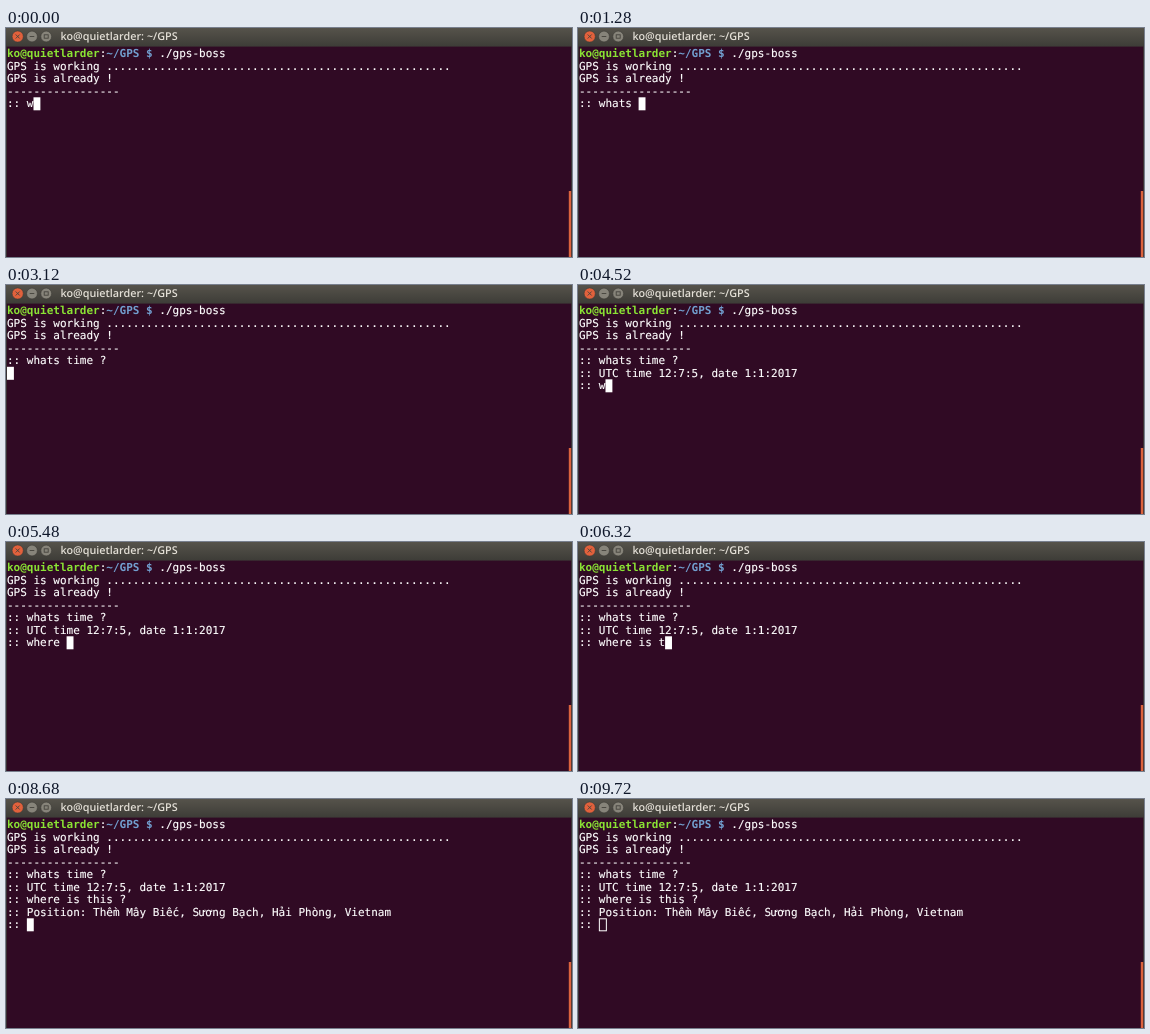
An HTML page for the animation above (9760 ms loop, 566 by 229 pixels).

```html
<!DOCTYPE html>
<html lang="en">
<head>
<meta charset="utf-8">
<title>GPS terminal</title>
<style>
  html, body { margin: 0; width: 100%; height: 100%; overflow: hidden; background: #300a24; }
  svg { display: block; }
  text { white-space: pre; text-rendering: geometricPrecision; }
  .mono { font: 11px "DejaVu Sans Mono", monospace; fill: #fff; stroke: #fff; stroke-width: .15; }
  .title { font: 600 10.8px "Open Sans", "Noto Sans", sans-serif; fill: #e3dfd6; }
  .user { font-weight: bold; fill: #8ae234; stroke: none; }
  .path { font-weight: bold; fill: #729fcf; stroke: none; }
</style>
</head>
<body>
<svg width="566" height="229" viewBox="0 0 566 229">
  <defs>
    <linearGradient id="bar" x2="0" y2="1">
      <stop offset="0" stop-color="#56534b"/>
      <stop offset="1" stop-color="#3d3c37"/>
    </linearGradient>
  </defs>
  <rect width="566" height="229" fill="#3c3b37"/>
  <rect width="566" height="18.6" fill="url(#bar)"/>
  <rect x=".8" y="18.6" width="564.4" height="211" fill="#300a24"/>
  <g stroke="#3d3c37" stroke-width=".6">
    <circle cx="11.7" cy="8.5" r="5.6" fill="#e2613c"/>
    <circle cx="26" cy="8.5" r="5.4" fill="#87847a"/>
    <circle cx="40.2" cy="8.5" r="5.4" fill="#87847a"/>
  </g>
  <g fill="none" stroke="#45433d" stroke-width=".9">
    <path d="M9.7 6.5l4 4m0-4l-4 4M23.7 8.5h4.6"/>
    <rect x="38.2" y="6.8" width="4" height="3.4"/>
  </g>
  <text class="title" x="54.5" y="12.4">ko@quietlarder: ~/GPS</text>
  <rect x="562.8" y="163" width="2.4" height="66" fill="#db633e"/>
  <text class="mono" x="1" y="29.4"><tspan class="user">ko@quietlarder</tspan>:<tspan class="path">~/GPS $</tspan> ./gps-boss</text>
  <g id="rows"></g>
  <rect id="cursor"/>
</svg>
<script>
const LOOP = 9760, CELL = 6.622, ROW = 12.5, LEFT = 1, TOP = 19.3, BLUR_AT = 9320;

const intro = ['GPS is working ' + '.'.repeat(52), 'GPS is already !', '-'.repeat(17), ''].join('\n');

// [time in ms, output appended at that time]
const steps = [
  [0, ':: w'], [280, 'h'], [520, 'a'], [1120, 't'], [1200, 's'], [1280, ' '],
  [1480, 't'], [1640, 'i'], [1720, 'm'], [1880, 'e'], [2040, ' '], [2200, '?'],
  [2880, '\n'],
  [3680, ':: UTC time 12:7:5, date 1:1:2017\n:: '],
  [4520, 'w'], [4720, 'he'], [4800, 'r'], [5080, 'e'], [5320, ' '],
  [5800, 'i'], [5960, 's'], [6120, ' '], [6320, 't'], [6520, 'h'],
  [6680, 'i'], [6760, 's'], [6800, ' '], [6880, '?'],
  [7600, '\n'],
  [8680, ':: Position: Thềm Mây Biếc, Sương Bạch, Hải Phòng, Vietnam\n:: ']
];

const cursor = document.getElementById('cursor');
const setAttrs = (el, attrs) => {
  for (const key in attrs) el.setAttribute(key, attrs[key]);
  return el;
};

const rows = Array.from({ length: 8 }, (_, i) => {
  const row = document.createElementNS('http://www.w3.org/2000/svg', 'text');
  setAttrs(row, { class: 'mono', x: LEFT, y: TOP + (i + 1) * ROW + 10.1 });
  return document.getElementById('rows').appendChild(row);
});

function moveCursor(col, line, hollow) {
  const inset = hollow ? 0.5 : 0;
  setAttrs(cursor, {
    x: LEFT + col * CELL + inset,
    y: TOP + line * ROW + inset,
    width: 7 - (hollow ? 0 : 0.1),
    height: 13 - 2 * inset,
    fill: hollow ? 'none' : '#fff',
    stroke: hollow ? '#fff' : 'none'
  });
}

let shown = '';
function draw(now) {
  const t = now % LOOP;
  const typed = steps.filter(([at]) => at <= t).map(([, s]) => s).join('');
  const hollow = t >= BLUR_AT;
  if (typed + hollow !== shown) {
    shown = typed + hollow;
    const lines = (intro + typed).split('\n');
    rows.forEach((row, i) => { row.textContent = lines[i] || ''; });
    moveCursor(lines[lines.length - 1].length, lines.length, hollow);
  }
}

const start = performance.now();
function tick() {
  draw(performance.now() - start);
  requestAnimationFrame(tick);
}
tick();
</script>
</body>
</html>
```
